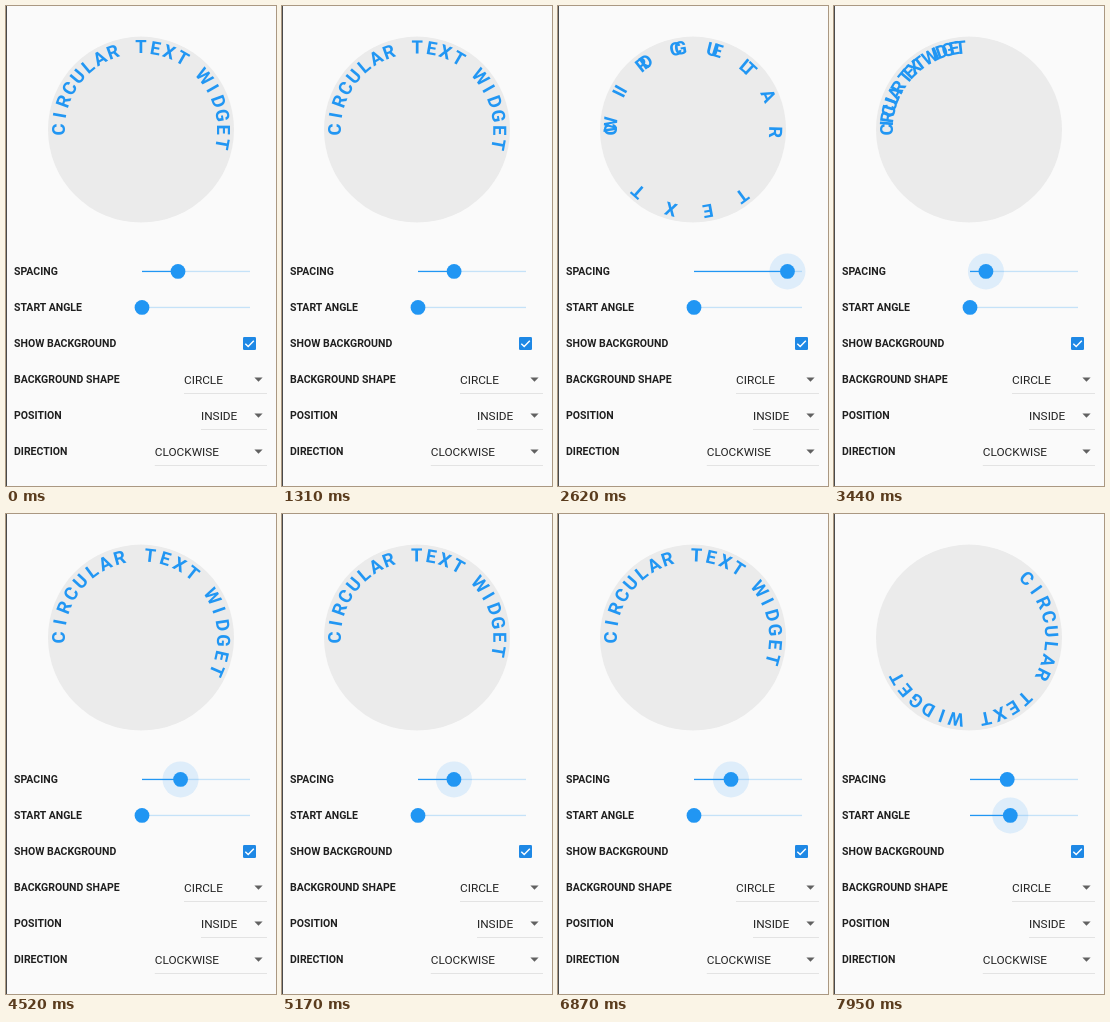
Animation of 270x480 px, one loop 7990 ms. Source, as an HTML page:

```html
<!DOCTYPE html>
<html lang="en">
<head>
<meta charset="utf-8">
<title>Circular text</title>
<style>
  html, body { margin: 0; width: 100%; height: 100%; overflow: hidden; background: #fafafa; }
  svg { display: block; width: 100vw; height: 100vh; font-family: Roboto, sans-serif; }
  .label { font-size: 10.5px; font-weight: 700; fill: #1f1f1f; }
  .choice { font-size: 11.8px; fill: #222; }
  .ring { font-size: 18.4px; font-weight: 700; fill: #2196f3; text-anchor: middle; }
  .rail { fill: #2196f3; fill-opacity: .24; }
  .active, .thumb { fill: #2196f3; }
  .halo { fill: #2196f3; fill-opacity: .13; }
</style>
</head>
<body>
<svg id="stage" viewBox="0 0 270 480">
  <rect width="270" height="480" fill="#fafafa"/>
  <circle cx="135" cy="123.6" r="93" fill="#ebebeb"/>
</svg>
<script>
const LOOP = 7990;
const TEXT = 'CIRCULAR TEXT WIDGET';
const CENTER = { x: 135, y: 123.6 };
const RADIUS = 82.7;
const BASELINE = 6.5;
const RAIL = { x: 136, width: 108 };

// [time, value] pairs: thumb positions and halo strengths
const SPACING = [[1310, 172], [1870, 213], [2270, 243], [2620, 229.5], [3440, 152], [3740, 137],
  [4120, 137], [4780, 194], [5170, 172], [5700, 141], [6120, 150.7], [6560, 171.5], [6920, 173.2]];
const START = [[7590, 136], [7950, 176.2], [7990, 179]];
const SPACING_HALO = [[1300, 0], [1400, 1], [6930, 1], [7040, 0]];
const START_HALO = [[7550, 0], [7650, 1]];

const stage = document.getElementById('stage');

function add(tag, attrs, text) {
  const node = document.createElementNS('http://www.w3.org/2000/svg', tag);
  for (const name in attrs) node.setAttribute(name, attrs[name]);
  if (text) node.textContent = text;
  stage.append(node);
  return node;
}

// Monotone cubic interpolation, constant outside the table
function sample(keys, t) {
  const last = keys.length - 1;
  if (t <= keys[0][0]) return keys[0][1];
  if (t >= keys[last][0]) return keys[last][1];
  const i = keys.findIndex(k => k[0] > t) - 1;
  const slope = j => (keys[j + 1][1] - keys[j][1]) / (keys[j + 1][0] - keys[j][0]);
  const tangent = j => {
    if (j === 0 || j === last) return slope(Math.min(j, last - 1));
    const a = slope(j - 1), b = slope(j);
    return a * b <= 0 ? 0 : 2 * a * b / (a + b);
  };
  const span = keys[i + 1][0] - keys[i][0];
  const u = (t - keys[i][0]) / span, v = 1 - u;
  return v * v * ((1 + 2 * u) * keys[i][1] + u * span * tangent(i)) +
    u * u * ((1 + 2 * v) * keys[i + 1][1] - v * span * tangent(i + 1));
}

function label(text, y) {
  add('text', { x: 8, y: y + 3.8, class: 'label' }, text);
}

function slider(name, y) {
  label(name, y);
  const bar = { x: RAIL.x, y: y - .6, height: 1.3 };
  const rail = add('rect', { ...bar, class: 'rail' });
  const active = add('rect', { ...bar, class: 'active' });
  const halo = add('circle', { cy: y, class: 'halo' });
  const thumb = add('circle', { cy: y, r: 7.4, class: 'thumb' });
  return (x, strength) => {
    active.setAttribute('width', x - RAIL.x);
    rail.setAttribute('x', x);
    rail.setAttribute('width', RAIL.x + RAIL.width - x);
    halo.setAttribute('cx', x);
    halo.setAttribute('r', 18 * strength);
    thumb.setAttribute('cx', x);
    return (x - RAIL.x) / RAIL.width;
  };
}

function dropdown(name, value, x, y) {
  label(name, y);
  add('text', { x, y: y + 4.3, class: 'choice' }, value);
  add('path', { d: `M248.4 ${y - 1.9}h8.2l-4.1 4.1z`, fill: '#616161' });
  add('rect', { x, y: y + 13.5, width: 261 - x, height: .7, fill: '#dadada' });
}

const setSpacing = slider('SPACING', 265.4);
const setStart = slider('START ANGLE', 301.4);

label('SHOW BACKGROUND', 337.5);
add('rect', { x: 237, y: 331, width: 13, height: 13, rx: 1.3, fill: '#1e88e5' });
add('path', { d: 'M239.3 337.7l2.9 2.9 5.6-5.8', fill: 'none', stroke: '#fff', 'stroke-width': 1.4 });

dropdown('BACKGROUND SHAPE', 'CIRCLE', 178, 373.5);
dropdown('POSITION', 'INSIDE', 195, 409.5);
dropdown('DIRECTION', 'CLOCKWISE', 148.8, 445.5);

add('rect', { width: 1, height: 480, fill: '#4a4a4a' });

const letters = [...TEXT].map(c => add('text', { y: BASELINE - RADIUS, class: 'ring' }, c));

function draw(t) {
  const step = 30 * setSpacing(sample(SPACING, t), sample(SPACING_HALO, t));
  const start = 360 * setStart(sample(START, t), sample(START_HALO, t));
  letters.forEach((letter, i) => letter.setAttribute('transform',
    `translate(${CENTER.x} ${CENTER.y}) rotate(${start - 90 + i * step})`));
}

const origin = performance.now();
function tick() {
  draw((performance.now() - origin) % LOOP);
  requestAnimationFrame(tick);
}
tick();
</script>
</body>
</html>
```
